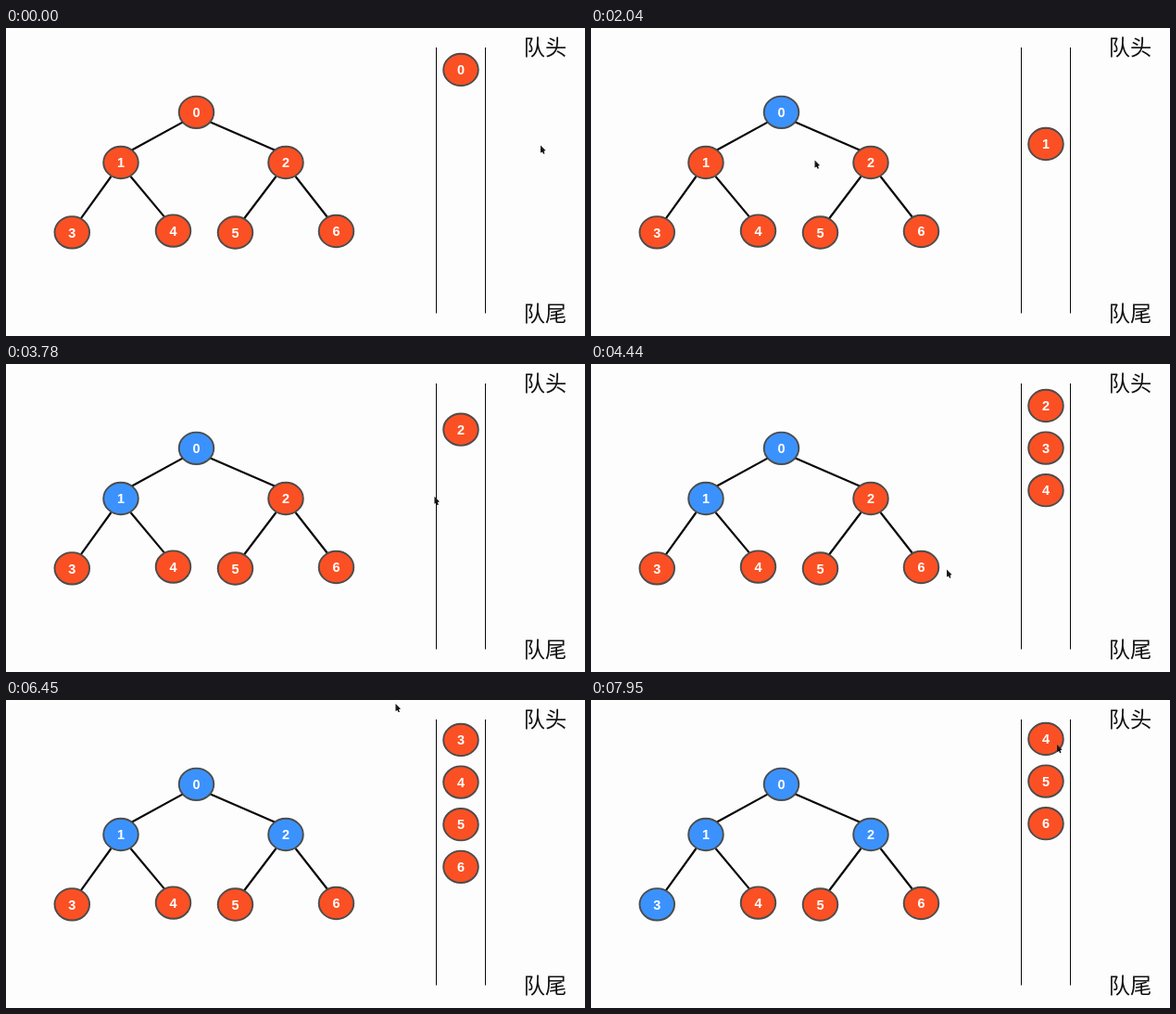
An HTML page with a canvas for the animation above (8 s loop, 625 px wide and 332 px high).

```html
<!DOCTYPE html>
<html lang="zh-CN">
<head>
<meta charset="utf-8">
<title>Queue traversal</title>
<style>
html, body { margin: 0; width: 100%; height: 100%; overflow: hidden; background: #fdfdfd; }
canvas { display: block; width: 625px; height: 332px; }
</style>
</head>
<body>
<canvas id="stage"></canvas>
<script>
const W = 625, H = 332, LOOP = 8000, STEP = 30, LAST = 7950;
const RED = '#fb5024', BLUE = '#3c92fc';
const BELOW = 351, ABOVE = -21, QUEUE_X = 491;

const canvas = document.getElementById('stage');
const ctx = canvas.getContext('2d');
const dpr = window.devicePixelRatio || 1;
canvas.width = W * dpr;
canvas.height = H * dpr;

// Binary tree in level order: the children of i are 2i + 1 and 2i + 2
const nodes = [
  [205.5, 90.8], [124, 145], [302, 145],
  [71.3, 220.3], [180.5, 218.6], [247.5, 220.5], [356.5, 219]
];

// Round r: item r leaves, its node turns blue, the rest move up, its children enter
const rounds = [
  { pop: 480, visit: 1110, shift: 1300, enter: 1645, stagger: 520, top: 45, gap: 51.3 },
  { pop: 3095, visit: 3480, shift: 3600, enter: 4020, stagger: 0, top: 45, gap: 45.6 },
  { pop: 4470, visit: 4920, shift: 5160, enter: 5670, stagger: 0, top: 43, gap: 45.6 },
  { pop: 6720, visit: 7170, shift: 7380, enter: LOOP, stagger: 0, top: 42, gap: 45.6 }
];

// Pointer tip: [time, x, y]
const pointer = [
  [0, 577, 126.5], [700, 430, 92], [1110, 197, 113], [2040, 241.5, 142.5],
  [2400, 446, 162], [3090, 546.5, 58.5], [4440, 384, 221.5], [4900, 324, 156],
  [5580, 279.5, 229.5], [6000, 428, 260], [6450, 420.5, 4], [7170, 80, 236],
  [LAST, 503, 48]
];

const clamp = v => Math.max(0, Math.min(1, v));
const mix = (a, b, p) => a + (b - a) * p;
const progress = (t, start, time) => (1 - Math.cos(Math.PI * clamp((t - start) / time))) / 2;

function queueY(i, t) {
  let y = i ? BELOW : rounds[0].top;
  rounds.forEach(({ pop, shift, enter, stagger, top, gap }, r) => {
    const place = top + gap * (i - r - 1);
    const child = i - 2 * r - 1;
    if (i === r) {
      y = mix(y, ABOVE, progress(t, pop, 240));
    } else if (i > r && child < 0) {
      y = mix(y, place, progress(t, shift, 360));
    } else if (child === 0 || child === 1) {
      const time = stagger ? 600 : 400;
      y = mix(BELOW + gap * child, place, progress(t, enter + stagger * child, time));
    }
  });
  return y;
}

function pointerAt(t) {
  const i = Math.max(1, pointer.findIndex(key => key[0] >= t));
  const [t0, x0, y0] = pointer[i - 1], [t1, x1, y1] = pointer[i];
  const p = progress(t, t0, t1 - t0);
  return [mix(x0, x1, p), mix(y0, y1, p)];
}

function line(x0, y0, x1, y1, width) {
  ctx.strokeStyle = '#080808';
  ctx.lineWidth = width;
  ctx.beginPath();
  ctx.moveTo(x0, y0);
  ctx.lineTo(x1, y1);
  ctx.stroke();
}

// Edges run from rim to rim; those of the root are flatter
function edge(child) {
  const parent = (child - 1) >> 1;
  const side = child % 2 ? -1 : 1;
  const [px, py] = nodes[parent], [cx, cy] = nodes[child];
  const [outX, outY, inX, inY] = parent ? [10.5, 15, 9.5, 15] : [14, 10.3, 11.5, 13.3];
  line(px + side * outX, py + outY, cx - side * inX, cy - inY, 2.2);
}

function disc(x, y, label, blue = 0) {
  ctx.beginPath();
  ctx.ellipse(x, y, 18.8, 17.2, 0, 0, Math.PI * 2);
  ctx.fillStyle = RED;
  ctx.fill();
  ctx.globalAlpha = blue;
  ctx.fillStyle = BLUE;
  ctx.fill();
  ctx.globalAlpha = 1;
  ctx.strokeStyle = '#4c4c4c';
  ctx.lineWidth = 1.9;
  ctx.stroke();
  ctx.fillStyle = '#fff';
  ctx.font = 'bold 14.5px "Liberation Sans", Arial, sans-serif';
  ctx.textAlign = 'center';
  ctx.fillText(label, x, y + 5.2);
}

function drawPointer(x, y) {
  ctx.fillStyle = '#1c1c1c';
  ctx.beginPath();
  ctx.moveTo(x, y);
  ctx.lineTo(x, y + 8);
  ctx.lineTo(x + 5.5, y + 5.5);
  ctx.fill();
  line(x + 2, y + 5, x + 3.8, y + 9, 1.5);
}

function draw(t) {
  ctx.setTransform(dpr, 0, 0, dpr, 0, 0);
  ctx.fillStyle = '#fdfdfd';
  ctx.fillRect(0, 0, W, H);

  for (let i = 1; i < nodes.length; i++) edge(i);
  for (const x of [464.5, 517.5]) line(x, 21, x, 307.5, 1);

  ctx.fillStyle = '#111';
  ctx.font = '23.2px "Noto Sans CJK SC", "Noto Sans CJK", sans-serif';
  ctx.textAlign = 'left';
  ctx.fillText('队头', 558.8, 28.8);
  ctx.fillText('队尾', 558.8, 315.8);

  nodes.forEach(([x, y], i) => {
    const round = rounds[i];
    disc(x, y, i, round ? clamp((t - round.visit) / 150) : 0);
    disc(QUEUE_X, queueY(i, t), i);
  });
  drawPointer(...pointerAt(t));
}

function frame() {
  const t = performance.now() % LOOP;
  draw(Math.min(LAST, Math.floor(t / STEP) * STEP));
  requestAnimationFrame(frame);
}
frame();
</script>
</body>
</html>
```
